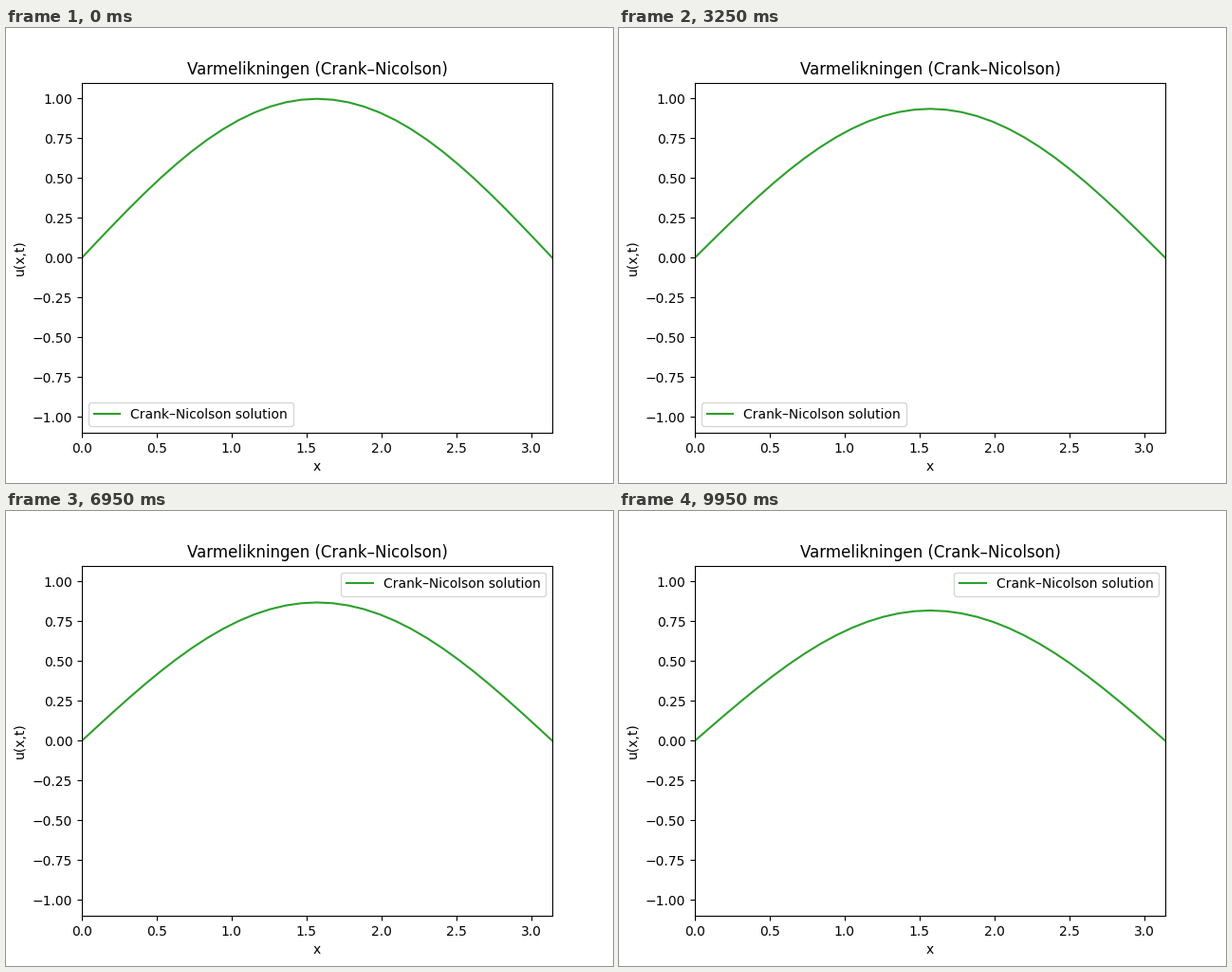
A matplotlib script that plays this animation: 640x480 px, repeating every 10000 ms.

```python
import numpy as np
import matplotlib.pyplot as plt
from matplotlib.animation import FuncAnimation

CELLS = 30
DT = 0.001
FRAMES = 200
FIRST_STEP = 2

h = np.pi / CELLS
x = np.linspace(0, np.pi, CELLS + 1)
mode = np.sin(x)

# sin(x) is an eigenvector of the scheme, so each step scales it by a constant
half = 0.5 * DT * (2 * np.sin(h / 2) / h) ** 2
decay = (1 - half) / (1 + half)

fig, ax = plt.subplots(figsize=(6.4, 4.8), dpi=100)
line, = ax.plot(x, mode, color="tab:green", label="Crank–Nicolson solution")
ax.set_xlim(0, np.pi)
ax.set_ylim(-1.1, 1.1)
ax.set_xlabel("x")
ax.set_ylabel("u(x,t)")
ax.set_title("Varmelikningen (Crank–Nicolson)")
ax.legend(loc="best")  # moves to the upper right once the curve clears it


def update(frame):
    line.set_ydata(mode * decay ** (frame + FIRST_STEP))
    return line,


anim = FuncAnimation(fig, update, frames=FRAMES, interval=50,
                     repeat=True, repeat_delay=0)
plt.show()
```
